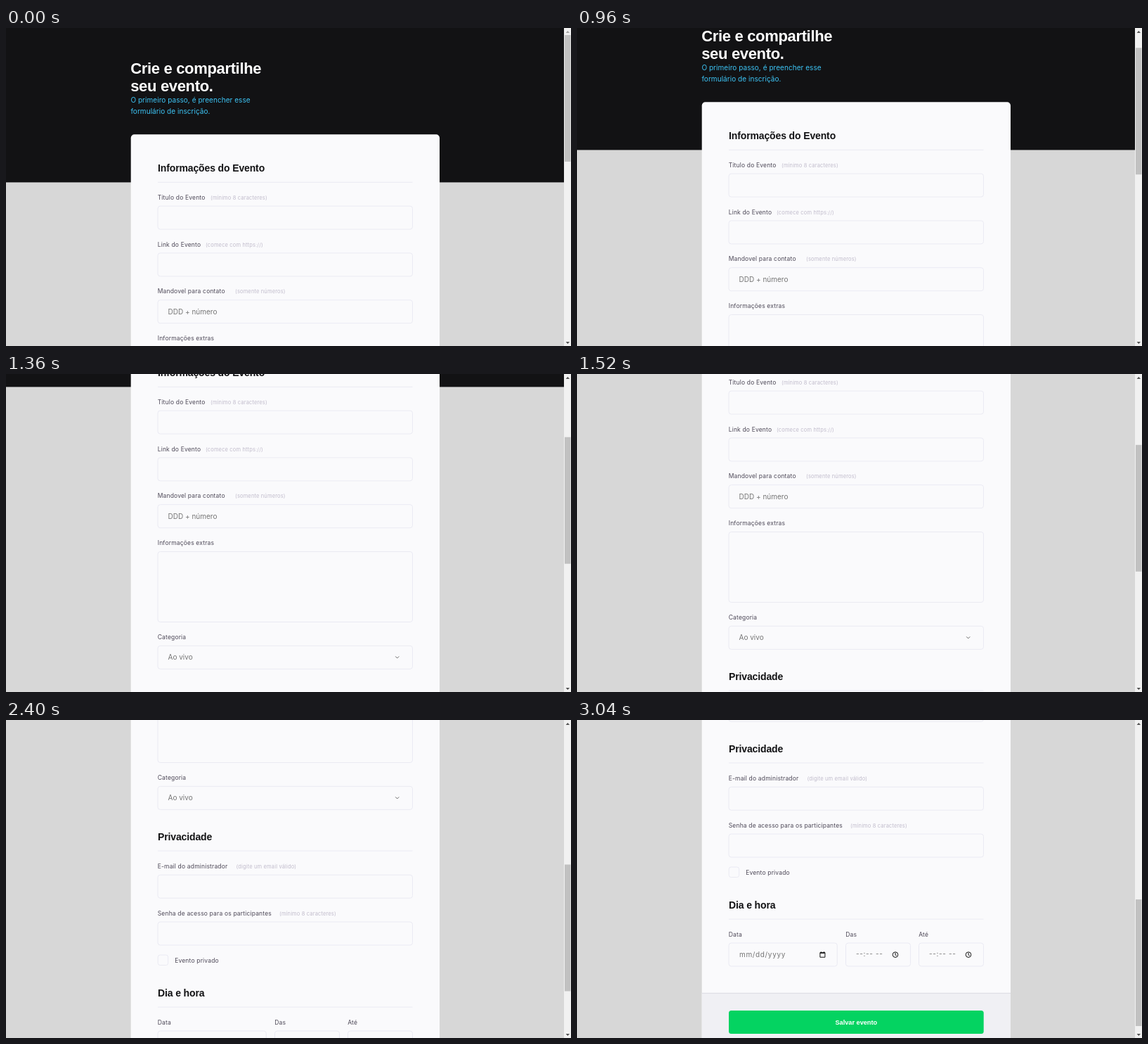
An HTML page for the animation above (3200 ms loop, 804x452 px).

```html
<!DOCTYPE html>
<html lang="pt-BR">
<head>
<meta charset="utf-8">
<title>Crie e compartilhe seu evento</title>
<style>
  html, body { margin: 0; width: 100%; height: 100%; overflow: hidden; background: #d7d7d7; }
  svg { display: block; width: 804px; height: 452px; }
  text { font-family: Inter, "Open Sans", sans-serif; }
  .title, .head, .save { font-family: Archivo, "Liberation Sans", Arial, sans-serif; font-weight: 700; }
  .title { font-size: 22px; letter-spacing: -.33px; fill: #fff; }
  .lead { font-size: 10px; letter-spacing: .05px; fill: #3dc5f6; }
  .head { font-size: 14px; letter-spacing: -.13px; fill: #121214; }
  .label { font-size: 8.5px; letter-spacing: .17px; fill: #4e4958; }
  .hint { font-size: 7.5px; letter-spacing: .15px; fill: #c1bccc; }
  .value { font-size: 10px; fill: #757575; }
  .date { letter-spacing: .65px; }
  .save { font-size: 9.2px; fill: #fff; text-anchor: middle; }
  .box { fill: #fafafc; stroke: #e6e6f0; stroke-width: .8; }
  .rule { stroke: #e6e6f0; stroke-width: .8; }
  .icon { fill: none; stroke: #111; stroke-width: 1; }
</style>
</head>
<body>
<svg viewBox="0 0 804 452">
  <rect width="804" height="452" fill="#d7d7d7"/>
  <g id="page"></g>
  <rect x="794" width="10" height="452" fill="#f1f1f1"/>
  <rect id="thumb" x="795" y="10" width="8.5" height="180" fill="#c1c1c1"/>
  <path id="up" d="M796.6 7L799.3 4L802 7Z"/>
  <path d="M796.6 446L799.3 449L802 446Z" fill="#505050"/>
</svg>
<script>
  const LOOP = 3200, STEP = 80, THUMB_RATIO = 0.3965;
  const page = document.getElementById('page');
  const thumb = document.getElementById('thumb');
  const up = document.getElementById('up');

  // [time in ms, scroll in px]: wheel bursts separated by rests
  const keys = [
    [0, 0], [640, 0], [720, 17], [800, 42], [880, 42],
    [960, 46], [1040, 86], [1120, 127], [1200, 160], [1280, 185], [1360, 201], [1440, 209.5],
    [1520, 229], [1600, 268], [1680, 303], [1760, 326], [1840, 335], [2000, 335],
    [2080, 353.5], [2160, 398], [2240, 441], [2320, 473], [2400, 493], [2480, 502.5], [2560, 502.5],
    [2640, 514], [2720, 538], [2800, 565], [2880, 589], [2960, 607], [3040, 618], [LOOP, 618]
  ];

  const text = (cls, x, y, s) => `<text class="${cls}" x="${x}" y="${y}">${s}</text>`;
  const box = (y, h = 33, x = 216, w = 362.5, r = 3.5) =>
    `<rect class="box" x="${x}" y="${y}" width="${w}" height="${h}" rx="${r}"/>`;
  const rule = y => `<path class="rule" d="M216 ${y}H578.5"/>`;
  const label = (y, s, hintX, hint) =>
    text('label', 215.7, y, s) + (hint ? text('hint', hintX, y, hint) : '');
  const field = (y, s, hintX, hint, h) => label(y, s, hintX, hint) + box(y + 9.3, h);
  const section = (y, s) => text('head', 216, y, s) + rule(y + 15.3);
  const clock = x =>
    `<circle class="icon" cx="${x}" cy="951.6" r="3.8"/><path class="icon" d="M${x} 949v2.8l1.8 1.1"/>`;
  const time = (x, name) =>
    text('label', x, 925.8, name) + box(935, 33, x + .3, 92) +
    text('value date', x + 14.8, 954.3, '--:-- --') + clock(x + 70.8);

  page.innerHTML = [
    '<rect width="794" height="219.4" fill="#121214"/>',
    text('title', 177.2, 64.8, 'Crie e compartilhe'),
    text('title', 177.2, 89.8, 'seu evento.'),
    text('lead', 177.4, 106.3, 'O primeiro passo, é preencher esse'),
    text('lead', 177.4, 121.9, 'formulário de inscrição.'),
    '<rect x="177.7" y="151.2" width="439.3" height="940" rx="5" fill="#fafafc"/>',

    section(204, 'Informações do Evento'),
    field(243.8, 'Título do Evento', 291, '(mínimo 8 caracteres)'),
    field(310.6, 'Link do Evento', 284, '(comece com https://)'),
    field(377.4, 'Mandovel para contato', 326, '(somente números)'),
    text('value', 230.5, 407, 'DDD + número'),
    field(444.2, 'Informações extras', 0, '', 100),
    field(578, 'Categoria'),
    text('value', 230.5, 607, 'Ao vivo'),
    '<path class="icon" d="M554.2 602.4l2.5 2.5l2.5 -2.5" style="stroke:#666"/>',

    section(663.7, 'Privacidade'),
    field(703.9, 'E-mail do administrador', 327.5, '(digite um email válido)'),
    field(770.7, 'Senha de acesso para os participantes', 389, '(mínimo 8 caracteres)'),
    box(827, 14.5, 216.2, 14.5, 3),
    text('label', 240.2, 837.8, 'Evento privado'),

    section(885.8, 'Dia e hora'),
    label(925.8, 'Data'),
    box(935, 33, 216, 154.3),
    text('value date', 231, 954.5, 'mm/dd/yyyy'),
    '<path class="icon" d="M345.9 948.6h7v6.6h-7zM345.9 949.3h7M347.3 947.2v1.6M351.5 947.2v1.6"/>',
    time(382.2, 'Das'),
    time(486.2, 'Até'),

    '<rect x="177.7" y="1006.3" width="439.3" height="85" fill="#f0f0f4"/>',
    '<path d="M177.7 1006.3H617" stroke="#d3d3de" stroke-width=".8"/>',
    '<rect x="216" y="1031" width="362.7" height="33" rx="3.5" fill="#04d361"/>',
    text('save', 397.3, 1050.8, 'Salvar evento')
  ].join('');

  function scrollAt(t) {
    const i = keys.findIndex(k => k[0] > t);
    const [t0, a] = keys[i - 1], [t1, b] = keys[i];
    return a + (b - a) * (t - t0) / (t1 - t0);
  }

  function draw(t) {
    const y = scrollAt(t);
    page.setAttribute('transform', `translate(0 ${-y})`);
    thumb.setAttribute('y', 10 + y * THUMB_RATIO);
    up.setAttribute('fill', y ? '#505050' : '#a3a3a3');
  }

  const start = performance.now();
  function tick() {
    const t = (performance.now() - start) % LOOP;
    draw(Math.floor(t / STEP) * STEP);
    requestAnimationFrame(tick);
  }
  tick();
</script>
</body>
</html>
```
